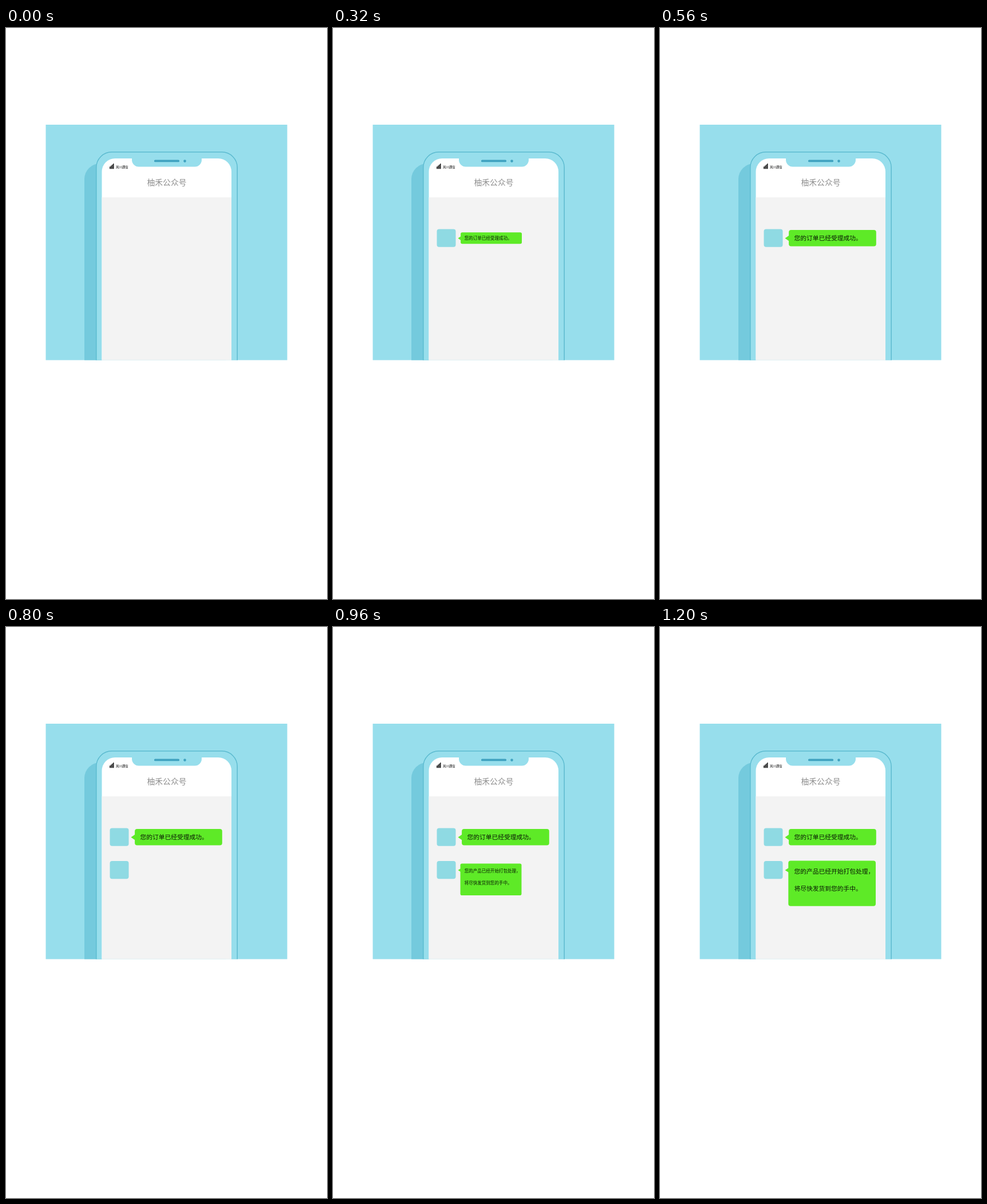
These frames come from a looping animation (561 by 998 pixels, 1440 ms). An HTML page with a canvas:

```html
<!DOCTYPE html>
<html lang="zh-CN">
<head>
<meta charset="utf-8">
<title>订单消息</title>
<style>
  html, body { margin: 0; width: 100%; height: 100%; overflow: hidden; background: #fff; }
  canvas { display: block; width: 561px; height: 998px; }
</style>
</head>
<body>
<canvas id="stage"></canvas>
<script>
const W = 561, H = 998, LOOP = 1440, TICK = 80;
const FONT = '"Noto Sans CJK SC", "Noto Sans CJK", "Noto Sans", sans-serif';
const SKY = '#97deec', EDGE = '#5cbbd0', SHADE = '#74cadd', DARK = '#3fa2c0';
const GREEN = '#5eea27', TILE = '#8fdae3';

const canvas = document.getElementById('stage');
const ctx = canvas.getContext('2d');
const ratio = window.devicePixelRatio || 1;
canvas.width = Math.round(W * ratio);
canvas.height = Math.round(H * ratio);

// Bubble geometry is relative to the tip of its tail.
const messages = [
  { start: 160, tip: [218.5, 367.5], tile: [181.5, 351.5],
    box: [6.6, -14.5, 152.7, 28.4], tail: 5,
    lines: [['您的订单已经受理成功。', -0.8]] },
  { start: 800, tip: [218.5, 425], tile: [181.5, 409],
    box: [5.8, -16.5, 152.7, 79.3], tail: 4,
    lines: [['您的产品已经开始打包处理，', 1.6], ['将尽快发货到您的手中。', 31.6]] }
];

function box(x, y, w, h, r, color) {
  ctx.beginPath();
  ctx.roundRect(x, y, w, h, r);
  ctx.fillStyle = color;
  ctx.fill();
}

function label(text, x, midY, size, color, weight = 400, align = 'left') {
  ctx.font = `${weight} ${size}px ${FONT}`;
  ctx.textAlign = align;
  ctx.fillStyle = color;
  ctx.fillText(text, x, midY + size * 0.38);
}

function drawPhone() {
  box(137, 237, 247, 400, 27, SHADE);
  box(157.8, 216.8, 246.4, 420, 27, SKY);
  ctx.strokeStyle = EDGE;
  ctx.lineWidth = 1.5;
  ctx.stroke();

  box(167.5, 228, 226.5, 400, [23, 23, 0, 0], '#fff');
  box(167.5, 296, 226.5, 300, 0, '#f3f3f3');
  box(220, 227, 122, 15.5, [0, 0, 12, 12], SKY);
  box(259, 230.5, 44, 3.8, 1.6, DARK);
  box(310.2, 230.3, 4.6, 4.6, 2.3, DARK);

  for (let i = 0; i < 4; i++) {
    const h = 4 + i * 1.7;
    box(181 + i * 2, 246.2 - h, 1.5, h, 0, '#111');
  }
  label('岚川通信', 192, 243.4, 5.4, '#000', 500);
  label('柚禾公众号', 281, 269.5, 13.8, '#8e8e8e', 400, 'center');
}

// Grows in three ticks to 105 %, then settles in two.
function popScale(age) {
  const n = Math.floor(age / TICK);
  return n <= 3 ? 0.35 * n : Math.max(1, 1.05 - 0.025 * (n - 3));
}

function drawMessage(m, t) {
  const age = t - m.start;
  if (age < 0) return;
  box(...m.tile, 33, 31.3, 4, TILE);

  const s = popScale(age);
  if (s === 0) return;
  ctx.save();
  ctx.translate(...m.tip);
  ctx.scale(s, s);
  box(...m.box, 4, GREEN);
  ctx.beginPath();
  ctx.moveTo(0, 0);
  ctx.lineTo(m.box[0] + 0.6, -m.tail);
  ctx.lineTo(m.box[0] + 0.6, m.tail);
  ctx.fill();
  for (const [text, y] of m.lines) label(text, 16, y, 10.75, '#0a1a05', 500);
  ctx.restore();
}

function draw(t) {
  ctx.setTransform(ratio, 0, 0, ratio, 0, 0);
  box(0, 0, W, H, 0, '#fff');
  ctx.save();
  ctx.beginPath();
  ctx.rect(69.5, 169, 422, 411.5);
  ctx.clip();
  box(69, 168, 423, 413, 0, SKY);
  drawPhone();
  for (const m of messages) drawMessage(m, t);
  ctx.restore();
}

const origin = performance.now();
function frame(now) {
  draw(Math.max(0, now - origin) % LOOP);
  requestAnimationFrame(frame);
}
draw(0);
requestAnimationFrame(frame);
</script>
</body>
</html>
```
